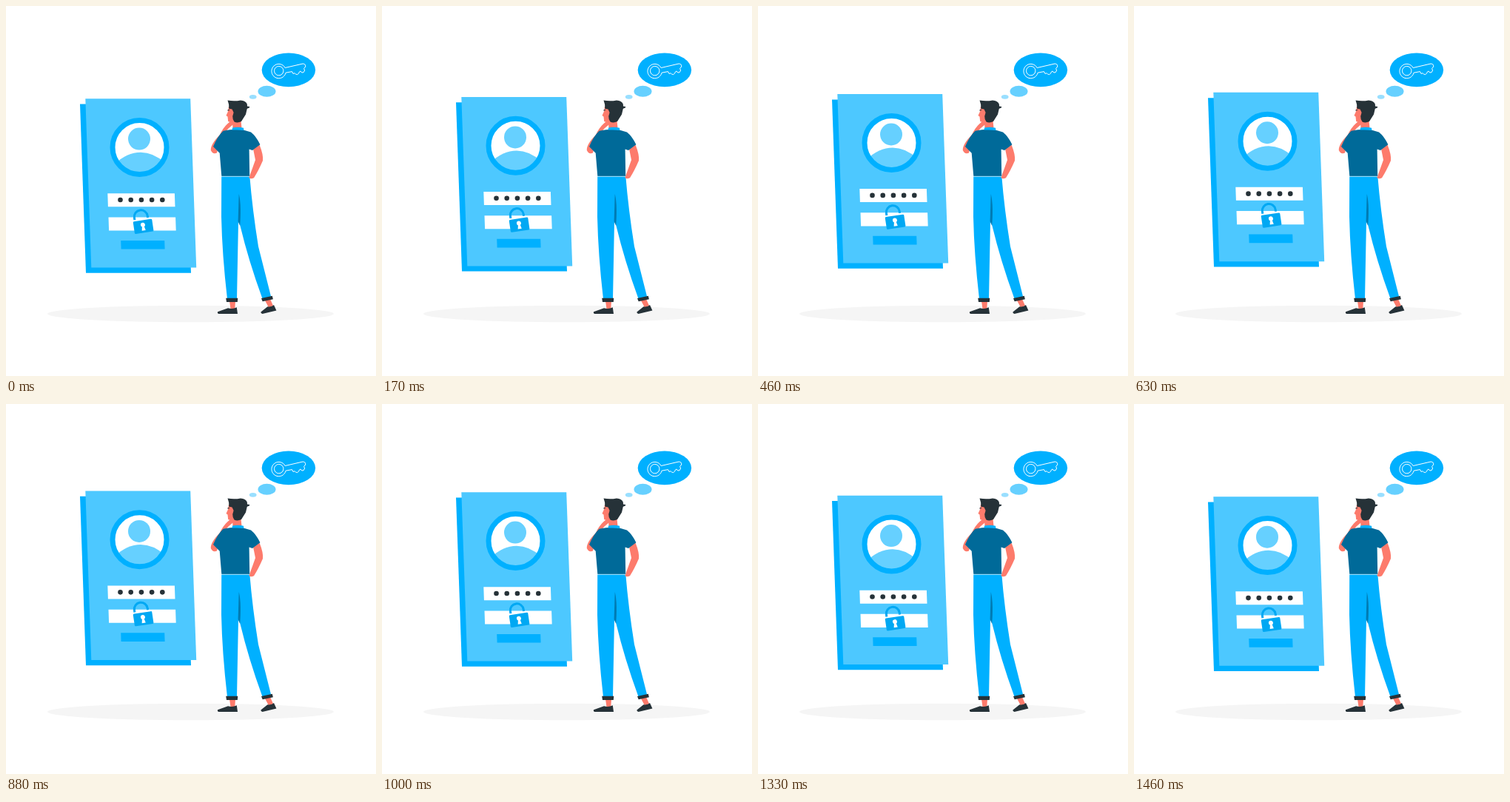
Recreate the animation shown at these times as an HTML page. Size 500x500 px, loop 1500 ms.

```html
<!DOCTYPE html>
<html lang="en">
<head>
<meta charset="utf-8">
<title>Forgotten password</title>
<style>
  html, body { margin: 0; width: 100%; height: 100%; overflow: hidden; background: #fff; }
  svg { display: block; width: 100vw; height: 100vh; }
  .blue { fill: #00b0ff; }
  .light { fill: #66d0ff; }
  .dark { fill: #263238; }
  .skin { fill: #fd7b6c; }
  .shirt { fill: #006a99; }
  .white { fill: #fff; }
  .line { fill: none; stroke: #fff; stroke-linejoin: round; }
</style>
</head>
<body>
<svg viewBox="0 0 500 500">
  <defs>
    <clipPath id="portrait"><circle cx="180.5" cy="191" r="34"/></clipPath>
  </defs>
  <ellipse cx="249.5" cy="416" rx="193.5" ry="11.3" fill="#f5f5f5"/>

  <g id="card">
    <path class="blue" d="M100 132.5H242L250 360.8H108Z"/>
    <path fill="#4dc8ff" d="M107.3 125.2H249.2L257.2 353.6H115.3Z"/>

    <circle class="white" cx="180.5" cy="191" r="36"/>
    <g class="light" clip-path="url(#portrait)">
      <circle cx="180" cy="179.6" r="15"/>
      <path d="M145 215Q163 197.7 182 197.7T218 215V232H145Z"/>
    </g>
    <circle cx="180.5" cy="191" r="36.5" fill="none" stroke="#00b0ff" stroke-width="7"/>

    <path class="white" d="M137.3 253.2H227.9L228.5 271.2H137.9ZM138.5 285.4H229.1L229.7 303.5H139.1Z"/>
    <g class="dark">
      <circle cx="154.5" cy="262" r="3.3"/>
      <circle cx="168.7" cy="262" r="3.3"/>
      <circle cx="182.9" cy="262" r="3.3"/>
      <circle cx="197.1" cy="262" r="3.3"/>
      <circle cx="211.3" cy="262" r="3.3"/>
    </g>
    <path class="blue" d="M155.2 316.9H214.2L214.6 328.6H155.6Z"/>

    <g transform="rotate(-8.5 185.5 298)">
      <path d="M175.3 287.5V284.5A9 9 0 0 1 193.3 284.5V287" fill="none" stroke="#00a8f3" stroke-width="3"/>
      <rect x="172.7" y="289.4" width="25.8" height="17" rx="1.5" fill="#00a8f3"/>
      <path class="white" d="M184 297.5H186.6L188 303.5H182.8Z"/>
      <circle class="white" cx="185.3" cy="295.6" r="3"/>
    </g>
  </g>

  <g>
    <ellipse class="blue" cx="381.9" cy="86.4" rx="36.2" ry="22.9"/>
    <ellipse class="light" cx="352.5" cy="115.2" rx="12" ry="7.5"/>
    <ellipse cx="333.7" cy="122.8" rx="4.9" ry="2.9" fill="#99dfff"/>
    <g class="line">
      <circle cx="368.7" cy="87.6" r="6.2"/>
      <path d="M377.2 83.5L401 78Q405 78 404.7 82L402.6 84.5L403.6 87Q402.5 91 399.6 90L398 88Q396.5 88 395.5 91Q394 94 391.5 92Q390.5 89.7 388 91.5L386.5 88.6L378.1 90.2A9.7 9.7 0 1 1 377.2 83.5Z"/>
    </g>
  </g>

  <g>
    <path class="skin" d="M302 399H310L309.3 409H303.5ZM350 398L357 396L361 405L355 407.5Z"/>
    <path class="dark" d="M286 413.2L300 408.2Q306 410 311.8 407.3L313 416H287Q285.2 415 286 413.2ZM344.4 413.6L353.5 406.3Q359 407 362 404L365.4 411.6L346.5 416Q344 415.5 344.4 413.6Z"/>
    <path class="blue" d="M291.2 230H329.3Q333 275 341 325L358.2 393L346.5 395.5Q328 345 316.2 296L314 291L312 396H299Q292 335 291 285Z"/>
    <path fill="#007bb3" d="M314.7 254Q318.3 268 316.2 297L313.6 291Z"/>
    <path class="dark" d="M297.2 394.8H313.3L312.8 400H298ZM345 395L359.8 391.7L360.9 396.2L346.7 399.2Z"/>

    <path class="skin" d="M334 193L342.5 187.5Q348 201 347 209Q341 223 335 232.2Q331 234.5 328.3 232L332 222L337 208Z"/>
    <path class="skin" d="M289 174Q293 165 299.5 159L305.5 154L308.3 159L300.5 165.5Q296 171 292 175L287 190L285 198.5Q279.5 201 276.8 195Q276.2 187 289 174Z"/>
    <path class="skin" d="M301 136L299.8 143L297.5 148L299.5 149.5L300.2 156L306 158L306.5 165Q313 169 318.5 165L317 150L311 136Z"/>
    <path class="dark" d="M299.5 127.6Q309 129 317 127.4Q324 128 325.8 132.5L326 135.5L329.3 136L328.8 137.5L325.8 138.7L324 146.5L318 156Q313 158.5 308.5 156.5Q306 153 306.2 149L307.6 144L305.5 139.5L301.3 138.8Q302 133.5 299.5 127.6Z"/>
    <path class="dark" d="M299.3 140.5L302 139.8V141L299.3 141.5Z"/>

    <path class="shirt" d="M302.5 167.3Q313 165.8 322.5 168L331 170.5Q338 176 343.4 187.2L333 195L328.6 193.5L329.2 230H291.3L288.7 198.8L280 190Q285.5 176.5 293.5 168.7Z"/>
    <path class="blue" d="M306 164.5Q313.5 163 321 164.7L321.4 168Q313 167 305.5 167.6Z"/>
    <path class="line" stroke-width=".7" d="M291 230.3H329.3"/>
  </g>
</svg>
<script>
  const card = document.getElementById('card');
  const LOOP = 1500, STEP = LOOP / 36, LEAD = 25, RISE = 10;

  // Linear rise and fall, advanced at 24 steps per second.
  const lift = ms => {
    const phase = (Math.floor((ms + 5) / STEP) * STEP + LEAD) % LOOP / LOOP;
    return RISE * (1 - Math.abs(2 * phase - 1));
  };
  const rest = lift(0);

  function draw() {
    const y = rest - lift(performance.now() % LOOP);
    card.setAttribute('transform', `translate(0 ${y.toFixed(3)})`);
    requestAnimationFrame(draw);
  }
  draw();
</script>
</body>
</html>
```
